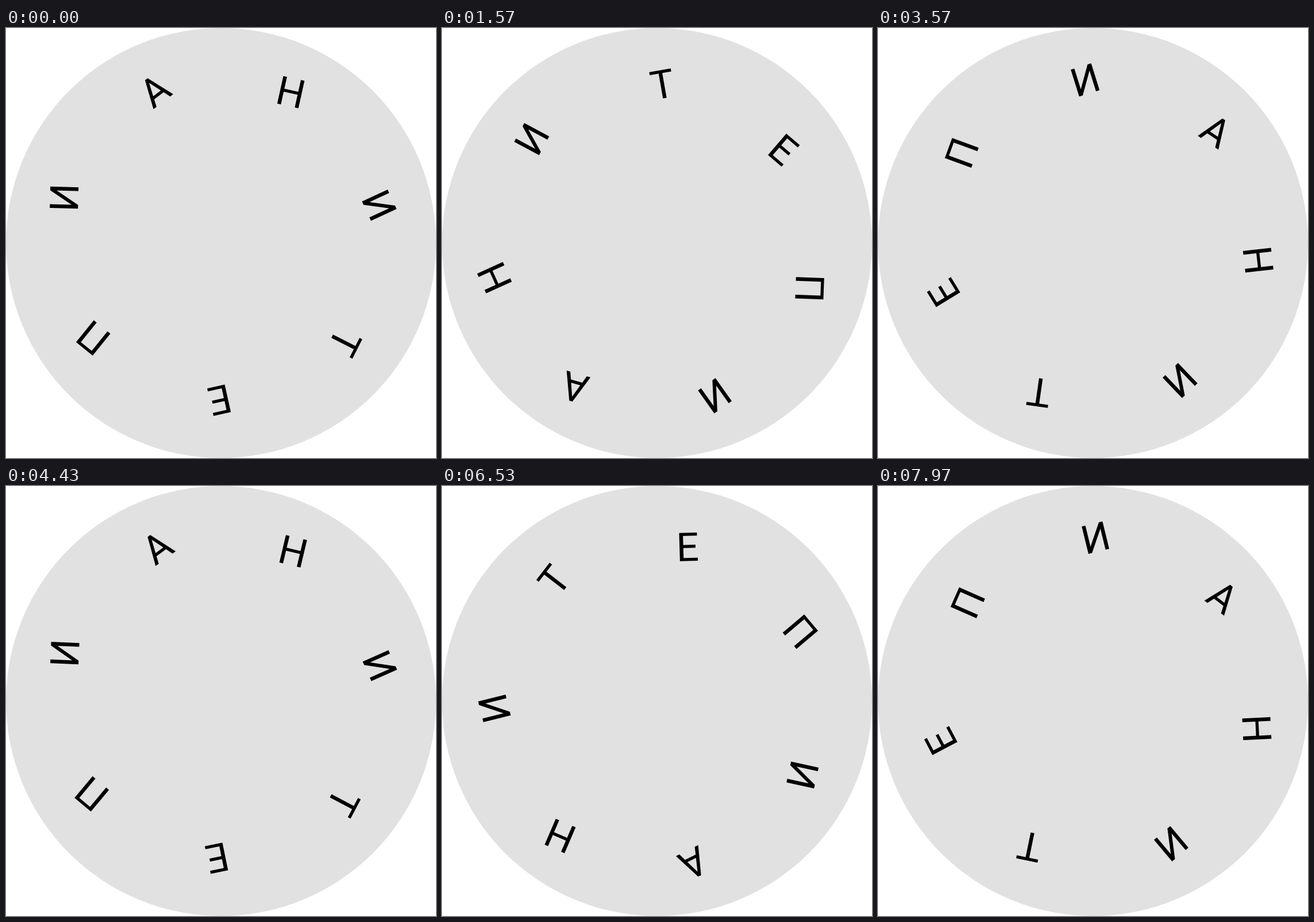
An HTML page with a canvas that plays this animation: 748x748 px, repeating every 8 s.

```html
<!DOCTYPE html>
<html lang="ru">
<head>
<meta charset="utf-8">
<style>
  html, body { margin: 0; width: 100%; height: 100%; overflow: hidden; background: #fff; }
  canvas { display: block; }
</style>
</head>
<body>
<canvas id="stage" width="748" height="748"></canvas>
<script>
const ctx = document.getElementById("stage").getContext("2d");
const CENTER = 374;
const RING = { x: -0.3, y: -8.2, radius: 281.7 };  // ring sits slightly off the pivot
const TILT = -13.1;                                // letters lean off the radius
const FRAME_MS = 100 / 3, FRAMES = 240, STEP = -2.7;

const letters = [
  ["А", -24.05], ["Н", 25.6], ["И", 78.3], ["Т", 130.05],
  ["Е", 180.6], ["П", 232.1], ["И", 284.65],
];

const rotate = degrees => ctx.rotate(degrees * Math.PI / 180);

function drawCentered(text) {
  const box = ctx.measureText(text);
  ctx.fillText(text,
    (box.actualBoundingBoxLeft - box.actualBoundingBoxRight) / 2,
    (box.actualBoundingBoxAscent - box.actualBoundingBoxDescent) / 2);
}

function draw(ms) {
  const frame = Math.floor(ms / FRAME_MS + 0.11) % FRAMES;
  ctx.clearRect(0, 0, 748, 748);
  ctx.save();
  ctx.translate(CENTER, CENTER);
  ctx.fillStyle = "#e1e1e1";
  ctx.beginPath();
  ctx.arc(0, 0, CENTER, 0, 2 * Math.PI);
  ctx.fill();

  rotate(frame * STEP);
  ctx.translate(RING.x, RING.y);
  ctx.fillStyle = "#000";
  ctx.font = "69px Roboto, sans-serif";
  for (const [letter, angle] of letters) {
    ctx.save();
    rotate(angle);
    ctx.translate(0, -RING.radius);
    rotate(TILT);
    drawCentered(letter);
    ctx.restore();
  }
  ctx.restore();
}

const start = performance.now();
function tick() {
  draw(performance.now() - start);
  requestAnimationFrame(tick);
}
tick();
</script>
</body>
</html>
```
